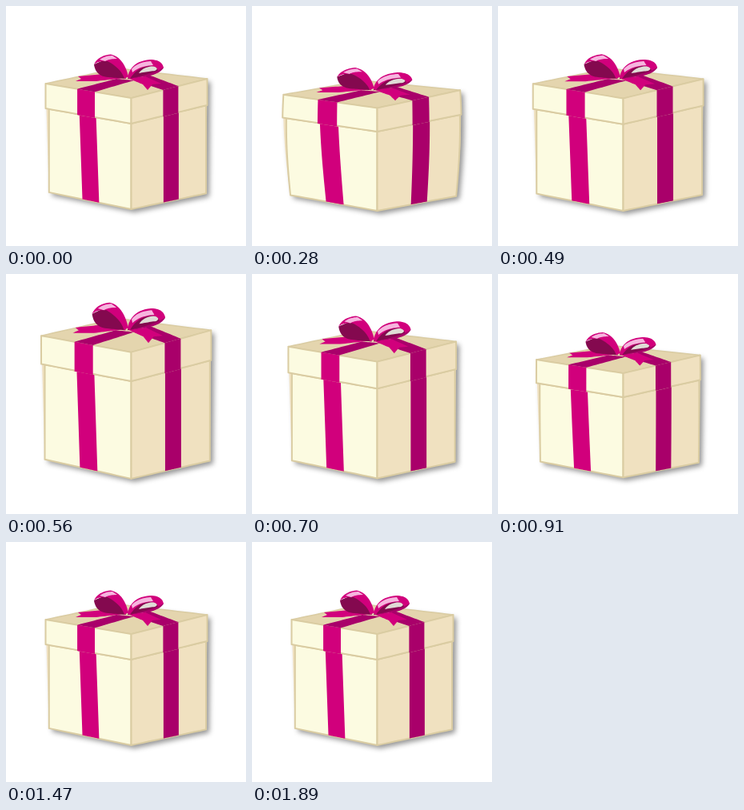
These frames come from a looping animation (300 by 300 pixels, 1.96 s). An HTML page with a canvas:

```html
<!DOCTYPE html>
<html>
<head>
<meta charset="utf-8">
<style>
html, body { margin: 0; width: 100%; height: 100%; overflow: hidden; background: #fff; }
canvas { display: block; width: 300px; height: 300px; }
</style>
</head>
<body>
<canvas id="stage" width="300" height="300"></canvas>
<script>
const ctx = document.getElementById('stage').getContext('2d');
const LOOP = 1960, REST = 280, STEP = 70;
const FRONT = 156.5, LID = 115, RIM = 147, BASE = 254;
const CREAM = '#fcfbe1', TAN = '#f0e1c0', TOP = '#e4d5ae', EDGE = '#dacca2';
const PINK = '#d1007c', DEEP = '#a9006a', DARK = '#84094f', GLOSS = '#f6b5de';

// The two visible walls: horizontal run, and rise of the far edge at lid and floor.
const LEFT = { run: -107, lidRise: 18, floorRise: 22 };
const RIGHT = { run: 95, lidRise: 24, floorRise: 20 };

let pose;

// Damped bounce: the squash oscillates while the extra width fades away.
function bounce(time) {
  const t = time - REST;
  if (t < 0) return { squash: 0, widen: 0, bulge: 0, drop: 0 };
  const fade = span => Math.exp(-((t / span) ** 4));
  const squash = .17 * fade(720) * Math.cos(2 * Math.PI * (t - 85) / 480);
  const press = Math.max(squash, 0) * fade(540);
  return { squash, widen: .055 * fade(540) - .25 * press, bulge: .9 * press, drop: 2 * fade(540) };
}

function warp(x, y) {
  const swell = 1 + pose.bulge * Math.sin(Math.PI * (BASE - y) / 230);
  return [FRONT + (x - FRONT) * (1 + pose.widen) * swell,
          BASE + pose.drop + (y - BASE) * (1 - pose.squash)];
}

// Points are [x, y] for a line or [cx, cy, x, y] for a curve.
function shape(color, points, edge = 0) {
  let [px, py] = points[0];
  ctx.beginPath();
  ctx.moveTo(...warp(px, py));
  for (const p of [...points.slice(1), points[0]]) {
    const [x, y] = p.slice(-2);
    const [cx, cy] = p.length > 2 ? p : [(px + x) / 2, (py + y) / 2];
    for (let i = 1; i <= 12; i++) {
      const t = i / 12, u = 1 - t;
      ctx.lineTo(...warp(u * u * px + 2 * u * t * cx + t * t * x,
                         u * u * py + 2 * u * t * cy + t * t * y));
    }
    [px, py] = [x, y];
  }
  ctx.closePath();
  ctx.fillStyle = color;
  ctx.fill();
  if (edge) {
    ctx.strokeStyle = EDGE;
    ctx.lineWidth = edge;
    ctx.stroke();
  }
}

// A point on a wall: a runs from the front edge (0) to the far edge (1).
function onWall(wall, a, y) {
  const rise = wall.lidRise + (wall.floorRise - wall.lidRise) * (y - LID) / (BASE - LID);
  return [FRONT + wall.run * a, y - rise * a];
}

function panel(color, wall, from, to, top, bottom, edge = 0, shear = 0) {
  shape(color, [onWall(wall, from, top), onWall(wall, to, top),
    onWall(wall, to - shear, bottom), onWall(wall, from - shear, bottom)], edge);
}

function drawBox() {
  ctx.save();
  ctx.shadowColor = 'rgba(0,0,0,.42)';
  ctx.shadowBlur = 6;
  ctx.shadowOffsetX = ctx.shadowOffsetY = 4;
  shape(TAN, [onWall(LEFT, 1, LID), [140, 78], onWall(RIGHT, 1, LID),
    onWall(RIGHT, .985, BASE), [FRONT, BASE], onWall(LEFT, .96, BASE)]);
  ctx.restore();

  panel(CREAM, LEFT, 0, .96, RIM, BASE, 2);
  panel(TAN, RIGHT, 0, .985, RIM, BASE, 2);
  panel(PINK, LEFT, .41, .605, RIM, BASE, 0, .035);
  panel(DEEP, RIGHT, .425, .625, RIM, BASE);

  shape(TOP, [onWall(LEFT, 1, LID), [140, 78], onWall(RIGHT, 1, LID), [FRONT, LID]], 1.5);
  panel(CREAM, LEFT, 0, 1, LID, RIM, 2);
  panel(TAN, RIGHT, 0, 1, LID, RIM, 2);
  panel(PINK, LEFT, .425, .63, LID, RIM + 1);
  panel(DEEP, RIGHT, .42, .62, LID, RIM + 1);
}

function drawBow() {
  // Bands and tails lying on the lid
  shape(DEEP, [onWall(LEFT, .63, LID), [138, 91], [160, 93], onWall(LEFT, .425, LID)]);
  shape(DEEP, [[160, 93], [178, 86], onWall(RIGHT, .62, LID), onWall(RIGHT, .42, LID)]);
  shape(PINK, [[87, 94], [94, 91], [90, 88], [122, 85], [148, 90], [112, 94]]);
  shape(PINK, [[152, 90], [174, 88], [194, 97], [183, 98], [177, 105], [171, 98]]);

  // Left loop
  shape(DARK, [[110, 73], [112, 88, 128, 89], [150, 91], [140, 66, 126, 66]]);
  shape(PINK, [[110, 73], [115, 62, 131, 60.5], [147, 64, 153, 88], [148, 91], [144, 78, 127, 69], [116, 68, 110, 73]]);
  shape(GLOSS, [[117, 67], [124, 62, 133, 62], [139, 66], [129, 66, 124, 69]]);

  // Right loop
  shape(DARK, [[152, 91], [160, 73, 184, 73], [197, 77], [190, 86, 152, 91]]);
  shape('#dfdcd6', [[166, 84], [171, 76, 185, 75], [192, 78, 186, 81], [177, 82, 166, 84]]);
  shape(PINK, [[152, 89], [156, 69, 180, 67], [195, 67, 197, 77], [190, 81], [189, 75, 180, 75], [164, 76, 155, 91]]);
  shape(GLOSS, [[157, 79], [164, 70, 181, 69], [184, 74], [167, 75, 158, 83]]);
  shape(DEEP, [[152, 91], [184, 85, 197, 77], [193, 84, 180, 87]]);
}

function frame(now) {
  pose = bounce(Math.floor((now % LOOP) / STEP) * STEP);
  ctx.clearRect(0, 0, 300, 300);
  ctx.lineJoin = 'round';
  drawBox();
  drawBow();
  requestAnimationFrame(frame);
}
requestAnimationFrame(frame);
</script>
</body>
</html>
```
